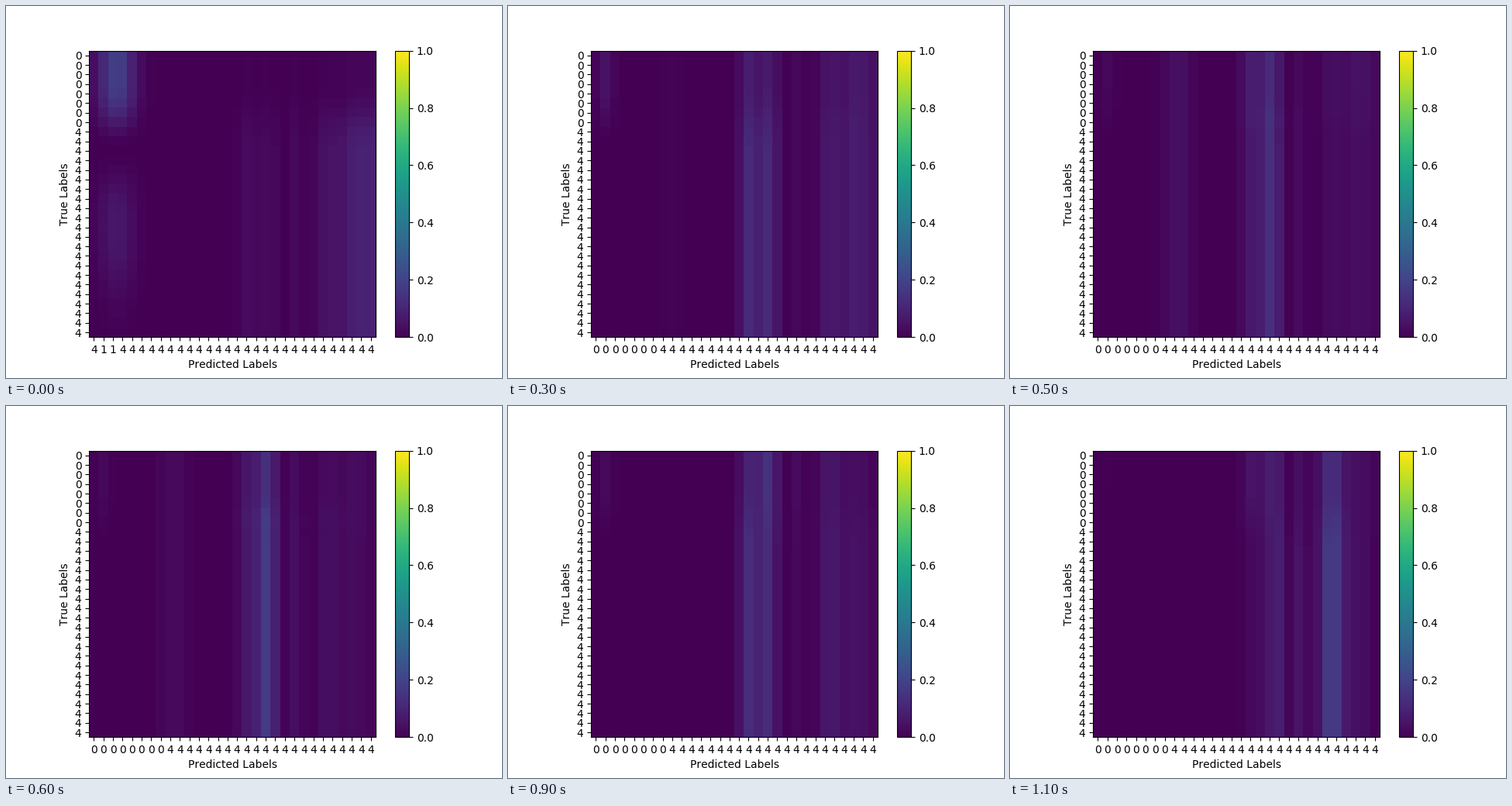
Write a matplotlib script that moves like this. It is 640x480 px and loops after 1.2 s.

```python
import numpy as np
import matplotlib.pyplot as plt
from matplotlib.animation import FuncAnimation

N = 30
FRAMES = 12
rows = np.arange(N)[:, None]
cols = np.arange(N)

# Steps at which the band heights below are given
KEYS = (0, 1, 3, 5, 7, 9, 11)

# Centre column, width, height in percent at each key
BANDS = [
    (16, 1.0, (3, 5.5, 11.5, 6.5, 5.5, 12.5, 2)),
    (18, 1.05, (2.5, 3.5, 11.5, 13.5, 21, 12.5, 6)),
    (19, 0.7, (1, 1.5, 1, 2, 1.5, 0, 6)),
    (21.2, 0.7, (2.7, 4, 2.5, 3, 5, 2.5, 5.5)),
    (24.5, 1.3, (5, 6.5, 7, 2.8, 5.5, 7, 19)),
    (27.3, 1.5, (8.5, 10, 8, 3.7, 2.5, 4.8, 4)),
    (29, 1.0, (7, 4, 2.5, 1, 0, 1.2, 0)),
]


def bell(x, mid, width):
    return np.exp(-((x - mid) / width) ** 2)


def ease(x, start, end):
    t = np.clip((x - start) / (end - start), 0, 1)
    return t * t * (3 - 2 * t)


def right_bands(i):
    # The upper rows trail behind the lower ones
    t = np.maximum(i - 0.7 * (1 - ease(rows, 3, 10)), 0)
    total = sum(np.interp(t, KEYS, height) * bell(cols, mid, width)
                for mid, width, height in BANDS)
    top = 0.17 + 0.75 * ease(i, 0, 4)
    shade = top + (1 - top) * ease(rows, 3, 10)
    swell = 1 + 0.13 * bell(rows, 6.6, 1.2) * bell(i, 6, 2)
    return total * shade * swell


def left_blob(i):
    mid = np.interp(i, (0, 1, 3), (2.4, 0.35, 1))
    width = np.interp(i, (0, 1, 3), (1.9, 1.25, 0.9))
    height = np.interp(i, (0, 1, 3, 5, 9, 11), (19, 30, 5, 2, 2.5, 0.4))
    echo = 0.36 * np.exp(-i) * bell(rows, 18 - 6 * i, 7)
    fade = 1 - ease(rows, 3, 10) + echo * ease(rows, 8, 16 - 4 * min(i, 1))
    return height * bell(cols, mid, width) * fade


def matrix(i):
    pulse = 4.2 * bell(i, 5, 1.6) * bell(cols, 8.4, 1.6)
    return (left_blob(i) + right_bands(i) + pulse) / 100


def predicted(i):
    if i == 0:
        head = "411"
    elif i == 1:
        head = "1111033"
    else:
        head = "0" * (7 if i < 6 else 8)
    return list(head.ljust(N, "4"))


plt.rcParams["font.family"] = "DejaVu Sans"
plt.rcParams["text.kerning_factor"] = 6
fig, ax = plt.subplots(figsize=(6.4, 4.8), dpi=100)
im = ax.imshow(matrix(0), cmap="viridis", vmin=0, vmax=1,
               interpolation="nearest")
fig.colorbar(im, ax=ax)
ax.set_xticks(cols, predicted(0))
ax.set_yticks(cols, list("0" * 8 + "4" * 22))
ax.set_xlabel("Predicted Labels")
ax.set_ylabel("True Labels")


def update(i):
    im.set_data(matrix(i))
    ax.set_xticklabels(predicted(i))
    return [im]


anim = FuncAnimation(fig, update, frames=FRAMES, interval=100,
                     repeat=True, repeat_delay=0, blit=False)
plt.show()
```
